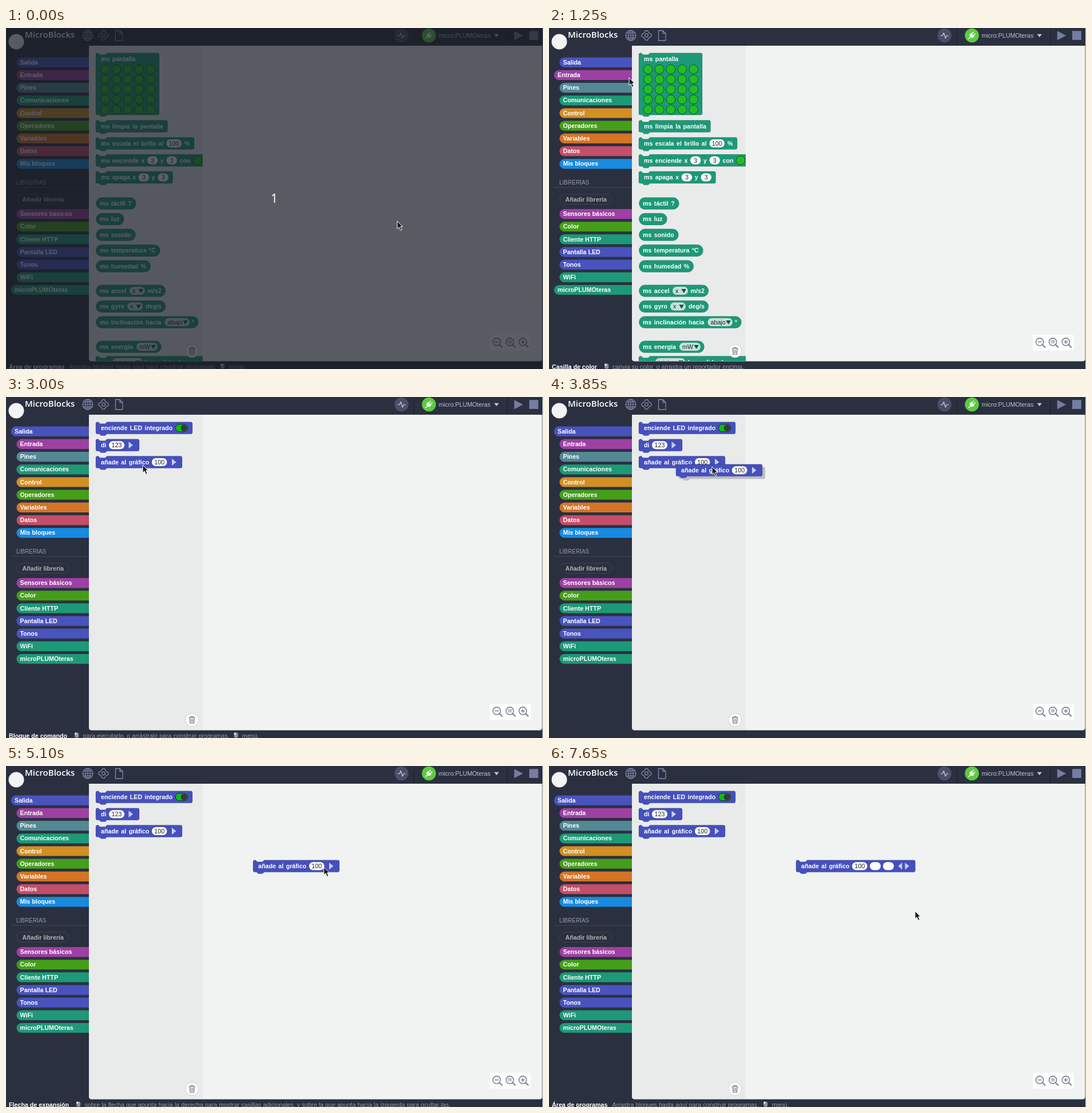
An HTML page that plays this animation: 939 by 597 pixels, repeating every 8 s.

```html
<!DOCTYPE html>
<html lang="es">
<head>
<meta charset="utf-8">
<title>Editor de bloques</title>
<style>
html, body { margin: 0; width: 100%; height: 100%; overflow: hidden; background: #2b3040; }
svg { display: block; font: 10.7px "Liberation Sans", Arial, sans-serif; }
text { white-space: pre; }
.b { font-weight: bold; fill: #fff; }
.w { word-spacing: 1.45px; }
.line { fill: none; stroke-linecap: round; stroke-linejoin: round; }
</style>
</head>
<body>
<svg id="stage" width="939" height="597" viewBox="0 0 939 597"></svg>
<script>
const GREEN = '#1d9977', BLUE = '#4650bc', ICON = '#8289ab', LED = '#22bd22';

const rect = (x, y, w, h, fill, r = 0, more = '') =>
  `<rect x="${x}" y="${y}" width="${w}" height="${h}" rx="${r}" fill="${fill}" ${more}/>`;
const circle = (x, y, r, fill, more = '') =>
  `<circle cx="${x}" cy="${y}" r="${r}" fill="${fill}" ${more}/>`;
const path = (d, fill, more = '') => `<path d="${d}" fill="${fill}" ${more}/>`;
const line = (d, color, w = 1.3) =>
  `<path class="line" d="${d}" stroke="${color}" stroke-width="${w}"/>`;
const text = (x, y, s, fill, more = '') => `<text x="${x}" y="${y}" fill="${fill}" ${more}>${s}</text>`;
const bold = (x, y, s) => `<text class="b" x="${x}" y="${y}">${s}</text>`;
const label = (x, c, s) => `<text class="b w" x="${x}" y="${c + 3.8}">${s}</text>`;
const group = (id, body, more = '') => `<g id="${id}" ${more}>${body}</g>`;

// Block parts; c is the vertical centre of a row
const slot = (x, c, w, s = '') =>
  rect(x, c - 7, w, 14, '#fff', 7) + text(x + w / 2, c + 3.9, s, '#222', 'text-anchor="middle"');
const menu = (x, c, w, s) =>
  rect(x, c - 7, w, 14, '#c3e2d8', 7) + text(x + 5, c + 3.8, s, '#222') +
  path(`M${x + w - 11.5},${c - 3}h8.4l-4.2,7z`, '#24483d');
const arrowR = (x, c) => path(`M${x},${c - 6}l7.5,6l-7.5,6z`, '#c9cdf1');
const arrowL = (x, c) => path(`M${x + 7},${c - 6}l-7,6l7,6z`, '#c9cdf1');
const shape = (x, y, w, h) =>
  `M${x},${y + 3}q0,-3 3,-3h1.5l3,3h9l3,-3H${x + w - 3}q3,0 3,3V${y + h - 3}q0,3 -3,3` +
  `H${x + 19.5}l-3,2.8h-7.5l-3,-2.8H${x + 3}q-3,0 -3,-3z`;
const command = (x, c, w, color, body, h = 21) =>
  path(shape(x, c - 10.5, w, h), color, 'stroke="#000" stroke-opacity=".22" stroke-width=".8"') + body;
const reporter = (c, w, body) =>
  rect(157.4, c - 10.2, w, 20.6, GREEN, 10.2, 'stroke="#000" stroke-opacity=".22" stroke-width=".8"') + body;
const plot = (x, c, w) => command(x, c, w, BLUE, label(x + 9, c, 'añade al gráfico') + slot(x + 98, c, 26.5, '100'));

// Sidebar
const tabs = [
  ['Salida', '#4953be'], ['Entrada', '#9e40a3'], ['Pines', '#548895'], ['Comunicaciones', GREEN],
  ['Control', '#d28f22'], ['Operadores', '#459e1a'], ['Variables', '#d37426'], ['Datos', '#c44e69'],
  ['Mis bloques', '#178bdf'], ['Sensores básicos', '#9e40a3'], ['Color', '#459e1a'],
  ['Cliente HTTP', GREEN], ['Pantalla LED', '#4953be'], ['Tonos', '#4953be'], ['WiFi', GREEN],
  ['microPLUMOteras', GREEN]
];
const tab = ([name, color], i) => {
  const c = i < 9 ? 60.2 + i * 22.2 : 325.6 + (i - 9) * 22.15;
  return group('tab' + i,
    path(`M27,${c - 8.6}H160V${c + 8.6}H27a8.6,8.6 0 0 1 0,-17.2z`, color) + bold(24.5, c + 3.6, name));
};
const sidebar = tabs.map(tab).join('') +
  text(18, 274.3, 'LIBRERÍAS', '#999cab', 'font-size="10"') +
  rect(9, 278.5, 136, 1, '#434859') +
  rect(18.5, 291, 91, 17.5, 'none', 8.7, 'stroke="#3f4352"') +
  text(28.5, 303.8, 'Añadir librería', '#b5b0ae', 'font-weight="bold"');

// Top bar
const gear = Array.from({ length: 16 }, (_, i) => {
  const r = i % 4 < 2 ? 8.6 : 6.4, a = (i * 22.5 - 101) * Math.PI / 180;
  return `${(170.5 + r * Math.cos(a)).toFixed(1)},${(13 + r * Math.sin(a)).toFixed(1)}`;
}).join('L');
const topbar =
  circle(18, 24, 13.5, '#f4f4f4') +
  text(33, 16.8, 'MicroBlocks', '#fff', 'font-family="Open Sans, sans-serif" font-weight="600" font-size="15"') +
  circle(143, 13, 8.8, 'none', `stroke="${ICON}" stroke-width="1.3"`) +
  `<ellipse cx="143" cy="13" rx="4.2" ry="8.8" fill="none" stroke="${ICON}" stroke-width="1.2"/>` +
  line('M143,4.5v17M134.5,13h17M136,8.6h14M136,17.4h14', ICON, 1.1) +
  line(`M${gear}Z`, ICON) + circle(170.5, 13, 2.8, 'none', `stroke="${ICON}" stroke-width="1.3"`) +
  line('M191.5,4.5h7.5l5,5v12.5h-12.5zM199,4.5v5h5', ICON) +
  circle(691.5, 13, 12.3, '#4a4f68') + line('M685,13.5h3l2.3,-5l3,9.5l2.2,-4.5h2.7', '#cfd2e0', 1.2) +
  rect(713, 0, 1, 30, '#1b1f2b') + rect(876, 0, 1, 30, '#1b1f2b') +
  circle(739.5, 13, 12.3, '#5bcc40') +
  `<g transform="translate(739.5 13) rotate(45)">` +
  path('M-4,-2h8v2.5q0,3.5 -4,3.5q-4,0 -4,-3.5z', '#fff') +
  line('M-2,-2.5v-3.5M2,-2.5v-3.5M0,4v4', '#fff', 1.4) + '</g>' +
  text(756.5, 16.8, 'micro:PLUMOteras', '#bdc0cd') +
  path('M853.5,10.8h8.4l-4.2,5.2z', '#c6c8d4') +
  path('M888.7,5.2l15.5,8l-15.5,8z', '#767da3') + rect(915, 5.2, 15.7, 15.7, '#767da3');

// Palettes
let leds = '';
for (let i = 0; i < 25; i++)
  leds += circle(173.2 + i % 5 * 19.9, 72.3 + Math.floor(i / 5) * 17.6, 7.9, LED, 'stroke="#14502a"');
const makerPalette =
  command(157, 54.3, 111, GREEN, label(166, 54.3, 'ms pantalla') + leds, 108.5) +
  command(157, 172, 125.5, GREEN, label(166, 172, 'ms limpia la pantalla')) +
  command(157, 202, 172, GREEN, label(166, 202, 'ms escala el brillo al') + slot(280.5, 202, 26.5, '100') + label(312, 202, '%')) +
  command(157, 231.8, 215, GREEN, label(166, 231.8, 'ms enciende x') + slot(247, 231.8, 18.5, '3') +
    label(270, 231.8, 'y') + slot(280.5, 231.8, 18.5, '3') + label(303.5, 231.8, 'con') +
    circle(335, 231.8, 7.9, LED, 'stroke="#14502a"')) +
  command(157, 261.5, 134.5, GREEN, label(166, 261.5, 'ms apaga x') + slot(231.7, 261.5, 18.5, '3') +
    label(254.7, 261.5, 'y') + slot(265.5, 261.5, 18.5, '3')) +
  [['táctil ?', 307, 70], ['luz', 334.5, 49], ['sonido', 362, 69], ['temperatura ºC', 389.5, 112], ['humedad %', 417, 95.5]]
    .map(([s, c, w]) => reporter(c, w, label(164, c, 'ms ' + s))).join('') +
  reporter(460, 121.5, label(164, 460, 'ms accel') + menu(216, 460, 27, 'x') + label(247.5, 460, 'm/s2')) +
  reporter(487.5, 121.5, label(164, 487.5, 'ms gyro') + menu(212, 487.5, 27, 'x') + label(244, 487.5, 'deg/s')) +
  reporter(515, 179, label(164, 515, 'ms inclinación hacia') + menu(277.5, 515, 43.5, 'abajo') + label(325, 515, 'º')) +
  reporter(558, 114, label(164, 558, 'ms energía') + menu(228, 558, 37, 'mW')) +
  command(157, 585, 215, GREEN, label(166, 585, 'ms') + menu(186, 585, 52, 'inicia') + label(243, 585, 'la medida de energía'));
const outPalette =
  command(157, 54.3, 169, BLUE, label(166, 54.3, 'enciende LED integrado') +
    rect(296.5, 47.8, 21.5, 13, '#0cbf0c', 6.5, 'stroke="#1c2340"') + circle(311.3, 54.3, 5.7, '#353a3c')) +
  command(157, 84.2, 76, BLUE, label(166, 84.2, 'di') + slot(180, 84.2, 27, '123') + arrowR(214.5, 84.2)) +
  plot(157, 114, 151) + arrowR(290, 114);

// Workspace
const glass = (x, d) => circle(x, 549.6, 6.6, 'none', 'stroke="#666b80" stroke-width="1.3"') +
  line(`M${x + 4.8},554.4l4.6,4.4`, '#666b80', 1.8) + line(d, '#666b80', 1.2);
const zoom = rect(846, 537, 72, 28, '#fcfdfd', 3) +
  glass(858, 'M855,549.6h6') + glass(881, 'M878,548.2h6M878,551h6') + glass(903.7, 'M900.7,549.6h6M903.7,546.6v6');
const trash = circle(325.2, 565.3, 11.6, '#fafbfb', 'stroke="#d0d2d6"') +
  line('M320.3,561.3h10M323.3,561v-1.7h4v1.7M321.3,561.5l.7,9.8h6.6l.7,-9.8M324,563.7v5.2M326.6,563.7v5.2', '#666b80', 1.1);
const bars = rect(931.5, 31, 3, 112, '#a3a7ba', 1.5) + rect(344, 577.5, 111, 3, '#a3a7ba', 1.5);
const base = [432, 175.3];
const expanded = [
  plot(...base, 151) + arrowR(565, base[1]),
  plot(...base, 185.5) + slot(561, base[1], 19, '') + arrowL(587.5, base[1]) + arrowR(599.5, base[1]),
  plot(...base, 208.5) + slot(561, base[1], 19, '') + slot(584, base[1], 19, '') + arrowL(610.5, base[1]) + arrowR(622.5, base[1])
];
const shadow = path(shape(437, 169.4, 151, 21), '#bcbec3');

// Status line: title, then [x, text] parts and mouse icons
const mouse = x => rect(x - 3.3, 587.5, 7, 9.3, '#8d91a0', 3) + rect(x - 3.3, 587.5, 3.3, 4, '#e4e6ee', 1.5);
const status = (id, title, parts, icons) => group(id, bold(5, 596.5, title) +
  parts.map(([x, s]) => text(x, 596.5, s, '#9497a5')).join('') + icons.map(mouse).join(''));
const hints =
  status('area', 'Área de programas', [[110.5, 'Arrastra bloques hasta aquí para construir programas.'], [390, 'menú.']], [378.5]) +
  status('color', 'Casilla de color', [[111, 'canvia su color, o arrastra un reportador encima.']], [100.5]) +
  status('cmd', 'Bloque de comando', [[134.5, 'para ejecutarlo, o arrástralo para construir programas.'], [413, 'menú.']], [123.5, 402]) +
  status('expand', 'Flecha de expansión', [[137.5, 'sobre la flecha que apunta hacia la derecha para mostrar casillas adicionales, y sobre la que apunta hacia la izquierda para ocultar-las.']], [126.5]);

const pointer = group('arrow', path('M0,0V13.6L3.2,10.7L5.6,16.4L8.2,15.3L5.8,9.8H9.8Z', '#1c1c1e', 'stroke="#fff" stroke-width="1"')) +
  group('hand', path('M2.2,4.8q1.4,-1.4 2.6,.2l1.8,3q4,-1.6 7.6,.8q1.2,1.4 1,4.2l-.7,4.8h-8.2l-1.2,-2.6q-2.6,-2 -2.2,-4q1.2,-.8 2,-.2z', '#2a2a2d', 'stroke="#fff" stroke-width=".9"'));

document.getElementById('stage').innerHTML =
  `<clipPath id="clip"><path d="M145,31H344V583H150q-5,0 -5,-5z"/></clipPath>` +
  rect(0, 0, 939, 597, '#2b3040') + sidebar + topbar +
  path('M145,31H937.5V579q0,4.5 -5,4.5H150q-5,0 -5,-5z', '#f1f3f2') +
  `<g clip-path="url(#clip)">` + rect(145, 31, 199, 553, '#e9ebeb') +
  group('maker', makerPalette) + group('out', outPalette) + '</g>' + trash + zoom +
  group('bars', bars) + group('paletteBar', rect(340, 31, 3, 380, '#a3a7ba', 1.5)) + hints +
  rect(938, 0, 1, 597, '#d6d8dd') +
  group('block', group('shadow', shadow) + expanded.map((s, i) => group('size' + i, s)).join('')) +
  group('dim', rect(0, 0, 939, 597, 'rgb(24,28,36)', 0, 'opacity=".7"') +
    text(469, 306, '1', '#fff', 'text-anchor="middle" font-family="Noto Sans, sans-serif" font-size="21"')) +
  group('cursor', pointer);

// Pointer tip: [time, x, y]
const route = [
  [0, 684, 338], [550, 684, 338], [700, 628, 312], [850, 500, 252], [1000, 352, 186], [1100, 254, 141], [1250, 140, 87],
  [1400, 108, 73], [1750, 78, 55], [2000, 78, 55], [2050, 77.5, 54.5], [2600, 77.5, 54.5], [2800, 160, 90],
  [3000, 239, 119], [3250, 220, 108], [3750, 220, 108], [3850, 285, 122], [4000, 445, 158], [4100, 495, 169],
  [4500, 495, 169], [4800, 545, 181], [4950, 545, 181], [5200, 563, 174.5], [5950, 563, 174.5], [6150, 600, 177.5],
  [6450, 600, 177.5], [6650, 597.5, 172.5], [7050, 597.5, 172.5], [7250, 618, 215], [7500, 640, 253.5], [7650, 640, 254], [8000, 640, 254]
];
// Latest entry at or before t gives the value
const hintSteps = [[0, 'area'], [1000, ''], [1100, 'color'], [1300, ''], [2750, 'cmd'], [3800, ''],
  [5100, 'expand'], [5650, 'cmd'], [6100, 'expand'], [7000, 'cmd'], [7200, 'area']];
const handSteps = [[0, 0], [5500, 1], [6500, 0], [6850, 1], [7100, 0]];
const sizeSteps = [[0, 0], [5650, 1], [7000, 2]];
const at = (steps, t) => steps.filter(s => s[0] <= t).pop()[1];

function tip(t) {
  const i = Math.max(1, route.findIndex(p => p[0] > t));
  const [t0, x0, y0] = route[i - 1], [t1, x1, y1] = route[i];
  const k = (t - t0) / (t1 - t0);
  return [x0 + (x1 - x0) * k, y0 + (y1 - y0) * k];
}

const nodes = {};
document.querySelectorAll('g[id]').forEach(g => nodes[g.id] = g);
const show = (id, on) => nodes[id].style.display = on ? '' : 'none';
const move = (id, x, y) => nodes[id].setAttribute('transform', `translate(${x} ${y})`);

function draw(t) {
  const [x, y] = tip(t), picked = t >= 2300;
  move('cursor', x, y);
  show('dim', t < 50);
  show('hand', at(handSteps, t));
  show('arrow', !at(handSteps, t));

  const hint = at(hintSteps, t), size = at(sizeSteps, t);
  ['area', 'color', 'cmd', 'expand'].forEach(id => show(id, id === hint));
  move('tab0', t >= 1550 ? -9.5 : 0, 0);
  move('tab1', t >= 1250 && t < 1550 ? -9.5 : 0, 0);
  move('tab15', picked ? 0 : -9.5, 0);
  show('maker', !picked);
  show('out', picked);
  show('paletteBar', !picked && x > 145 && x < 344);

  show('block', t >= 3800);
  show('shadow', t < 4400);
  for (let i = 0; i < 3; i++) show('size' + i, i === size);
  const held = t < 4100;
  move('block', held ? x - 495 : 0, held ? y - 169 : 0);
  show('bars', t >= 3950 && t < 4700);
}

const start = performance.now();
function tick() {
  const t = (performance.now() - start) % 8000;
  draw(Math.floor(t / 50) * 50);
  requestAnimationFrame(tick);
}
draw(0);
tick();
</script>
</body>
</html>
```
